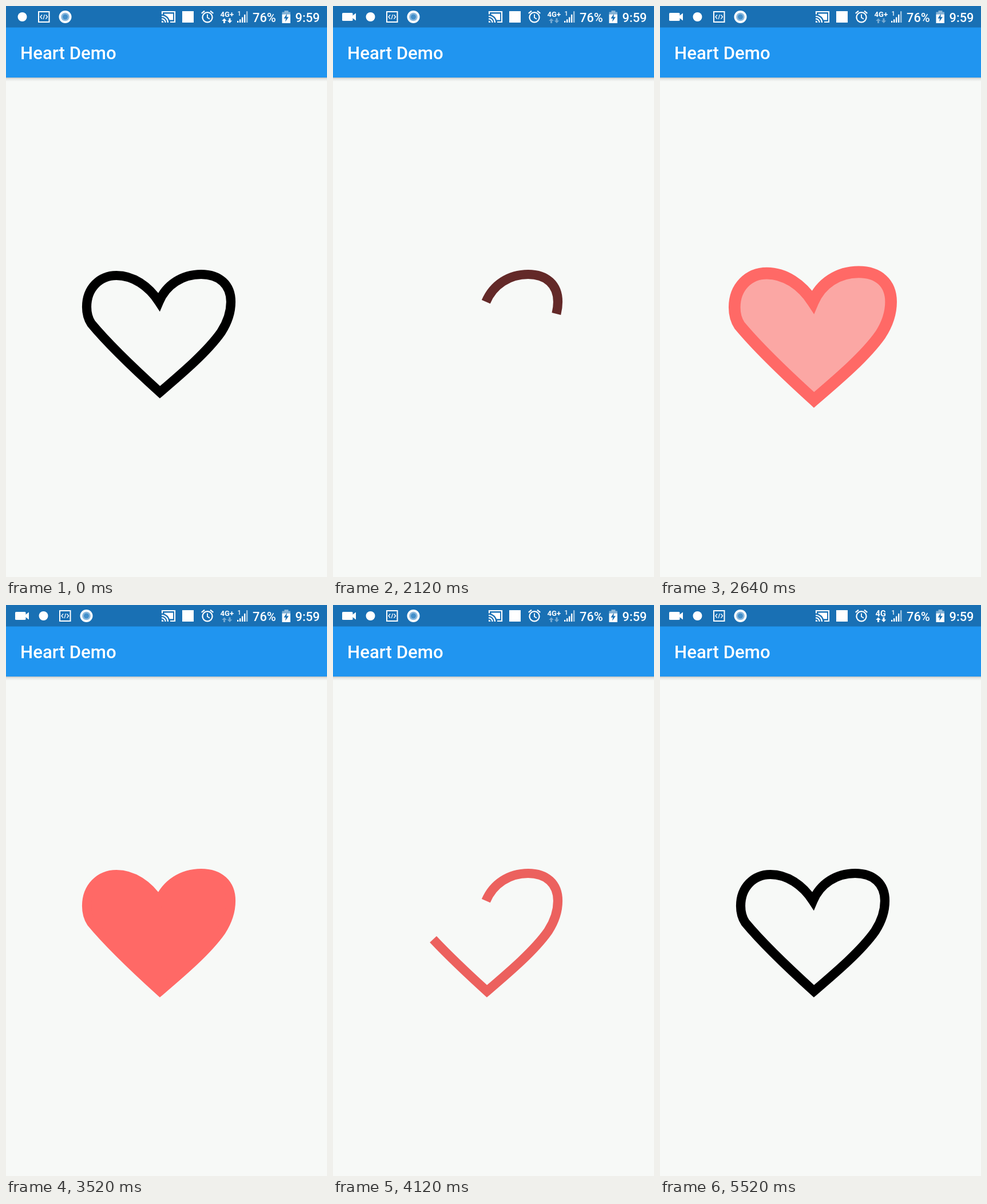
An HTML page with a canvas for the animation above (6240 ms loop, 561 by 998 pixels).

```html
<!DOCTYPE html>
<html lang="en">
<head>
<meta charset="utf-8">
<title>Heart Demo</title>
<style>
html, body { margin: 0; width: 100%; height: 100%; overflow: hidden; background: #f7f9f7; }
canvas { display: block; width: 561px; height: 998px; }
</style>
</head>
<body>
<canvas id="stage"></canvas>
<script>
const W = 561, H = 998, LOOP = 6240, STEP = 40;
const RED = [255, 105, 102];
const BAR = '#1970b4';
const canvas = document.getElementById('stage');
const ctx = canvas.getContext('2d');
const ratio = window.devicePixelRatio || 1;
canvas.width = W * ratio;
canvas.height = H * ratio;

const NOTCH = { x: 267.3, y: 517 };
const HEART = 'M267.3 517C280 487 308 469 341 469C373 469 393 487 393 517' +
  'C393 535 387 553 376 570C352 604 310 640 269 675' +
  'C226 636 178 590 149 555C143 546 141 536 141 526' +
  'C141 493 164 471 193 471C222 471 249 489 267.3 517';
const openHeart = new Path2D(HEART);
const fullHeart = new Path2D(HEART + 'Z');
const ruler = document.createElementNS('http://www.w3.org/2000/svg', 'path');
ruler.setAttribute('d', HEART);
const heartLength = ruler.getTotalLength();

const clamp = v => Math.max(0, Math.min(1, v));
const ramp = (t, a, b) => clamp((t - a) / (b - a));
const white = a => `rgba(255,255,255,${a})`;

function rect(x, y, w, h, color) {
  ctx.fillStyle = color;
  ctx.fillRect(x, y, w, h);
}

function disc(x, y, r, color) {
  ctx.fillStyle = color;
  ctx.beginPath();
  ctx.arc(x, y, r, 0, Math.PI * 2);
  ctx.fill();
}

function trace(points) {
  ctx.beginPath();
  for (let i = 0; i < points.length; i += 2) ctx.lineTo(points[i], points[i + 1]);
}

function poly(points, color) {
  trace(points);
  ctx.fillStyle = color;
  ctx.fill();
}

function line(points, width) {
  trace(points);
  ctx.strokeStyle = '#fff';
  ctx.lineWidth = width;
  ctx.stroke();
}

function arc(x, y, r, from, to, width) {
  ctx.beginPath();
  ctx.arc(x, y, r, from, to);
  ctx.strokeStyle = '#fff';
  ctx.lineWidth = width;
  ctx.stroke();
}

function text(str, x, y, size, weight = 500) {
  ctx.font = `${weight} ${size}px Roboto, "Open Sans", sans-serif`;
  ctx.fillStyle = '#fff';
  ctx.fillText(str, x, y);
}

function noticeIcons(t) {
  const k = ramp(t, 0, 240);
  const ease = 1 - (1 - k) * (1 - k);
  if (k > 0) {
    ctx.save();
    ctx.globalAlpha = ease;
    ctx.translate(28, 19);
    ctx.scale(ease, ease);
    ctx.fillStyle = '#fff';
    ctx.beginPath();
    ctx.roundRect(-12, -7, 18.5, 14, 1.5);
    ctx.fill();
    poly([6, -2, 12, -6.5, 12, 6.5, 6, 2], '#fff');
    ctx.restore();
  }
  ctx.save();
  ctx.translate(37 * ease, 0);
  disc(28.5, 19, 8, '#fff');
  ctx.strokeStyle = '#fff';
  ctx.lineWidth = 2;
  ctx.strokeRect(57, 10, 18.5, 18);
  line([63, 15.5, 60, 19, 63, 22.5], 1.4);
  line([69.5, 15.5, 72.5, 19, 69.5, 22.5], 1.4);
  line([67.4, 15, 65.2, 23], 1.2);
  disc(103.5, 19, 11, '#fff');
  disc(103.5, 19, 7.3, '#8ab8dd');
  disc(103.5, 19, 4.5, '#438fca');
  ctx.restore();
}

function castIcon() {
  const x = 272, y = 29, q = -Math.PI / 2;
  line([273, 14.5, 273, 10, 295, 10, 295, 28, 287, 28], 2.2);
  for (const r of [6.6, 11]) arc(x, y, r, q, 0, 2.2);
  ctx.fillStyle = '#fff';
  ctx.beginPath();
  ctx.moveTo(x, y);
  ctx.arc(x, y, 3.3, q, 0);
  ctx.fill();
  ctx.beginPath();
  ctx.moveTo(276.5, 13.5);
  ctx.lineTo(292, 13.5);
  ctx.lineTo(292, 24.5);
  ctx.lineTo(286, 24.5);
  ctx.quadraticCurveTo(283, 17.5, 276.5, 15.3);
  ctx.fill();
}

function alarmIcon() {
  arc(352, 19.8, 8.6, 0, Math.PI * 2, 2.2);
  line([352, 14.5, 352, 20.3, 356, 22.8], 1.8);
  line([341.8, 12.8, 347, 8.6], 2.2);
  line([362.2, 12.8, 357, 8.6], 2.2);
}

function networkIcon(t) {
  if (t < 4560) text('4G+', 374.6, 19, 13, 700);
  else text('4G', 376.6, 19.5, 14.5, 700);
  const busy = t < 1520 || (t >= 2720 && t < 3520) || t >= 5520;
  const color = white(busy ? 1 : 0.4);
  poly([381.5, 21.5, 385.8, 26, 383, 26, 383, 30, 380, 30, 380, 26, 377.2, 26], color);
  poly([391, 30, 386.7, 25.5, 389.5, 25.5, 389.5, 21.5, 392.5, 21.5, 392.5, 25.5, 395.3, 25.5], color);
  text('1', 404.5, 17, 11);
  for (let i = 0; i < 5; i++) {
    const h = 3 + i * 2.2 + i * i * 0.5;
    rect(404 + i * 4, 29 - h, 2.4, h, white(i < 4 ? 1 : 0.6));
  }
}

function batteryIcon() {
  rect(486.5, 8, 7, 3, white(0.45));
  rect(482.5, 10.5, 14.5, 4, white(0.45));
  rect(482.5, 14.5, 14.5, 15.5, '#fff');
  poly([491, 13.5, 485.5, 21.8, 489, 21.8, 488.2, 27.5, 494, 19.2, 490.4, 19.2], BAR);
}

function chrome(t) {
  rect(0, 0, W, H, '#f7f9f7');
  const shade = ctx.createLinearGradient(0, 125, 0, 132);
  shade.addColorStop(0, 'rgba(0,0,0,.22)');
  shade.addColorStop(0.35, 'rgba(0,0,0,.08)');
  shade.addColorStop(1, 'rgba(0,0,0,0)');
  rect(0, 125, W, 7, shade);
  rect(0, 0, W, 125, '#2095f0');
  rect(0, 0, W, 37.5, BAR);
  text('Heart Demo', 25, 93, 31.2);
  noticeIcons(t);
  castIcon();
  rect(308, 9, 20, 20, '#fff');
  alarmIcon();
  networkIcon(t);
  text('76%', 431, 27.5, 21.8);
  batteryIcon();
  text('9:59', 505.5, 27.5, 21.8);
}

// Position on the one second "like" timeline; it runs forward, then back.
function likeTime(t) {
  if (t < 1880) return 0;
  if (t < 3760) return Math.min(1000, t - 1860);
  return Math.max(0, 4740 - t);
}

function heart(p) {
  const trim = p < 350 ? 1 - p / 350 : ramp(p, 350, 750);
  const pulse = ramp(p, 667, 800) * (1 - ramp(p, 800, 1000));
  const tint = ramp(p, 0, 670);
  const fade = ramp(p, 667, 867);
  const scale = 1 + 0.1 * pulse;

  ctx.save();
  ctx.translate(NOTCH.x, NOTCH.y);
  ctx.scale(scale, scale);
  ctx.translate(-NOTCH.x, -NOTCH.y);
  if (fade > 0) {
    ctx.fillStyle = `rgba(${RED},${fade})`;
    ctx.fill(fullHeart);
  }
  ctx.strokeStyle = `rgb(${RED.map(c => Math.round(c * tint))})`;
  ctx.lineWidth = (16.2 + 5.2 * pulse) / scale;
  if (trim >= 1) {
    ctx.stroke(fullHeart);
  } else if (trim > 0) {
    ctx.setLineDash([heartLength * trim, heartLength * 2]);
    ctx.stroke(openHeart);
  }
  ctx.restore();
}

function draw(now) {
  const t = Math.floor((now % LOOP) / STEP) * STEP;
  ctx.setTransform(ratio, 0, 0, ratio, 0, 0);
  chrome(t);
  heart(likeTime(t));
  requestAnimationFrame(draw);
}

let start;
requestAnimationFrame(now => {
  start = now;
  const tick = time => draw(Math.max(0, time - start));
  const raf = window.requestAnimationFrame.bind(window);
  window.requestAnimationFrame = () => raf(tick);
  tick(now);
});
</script>
</body>
</html>
```
